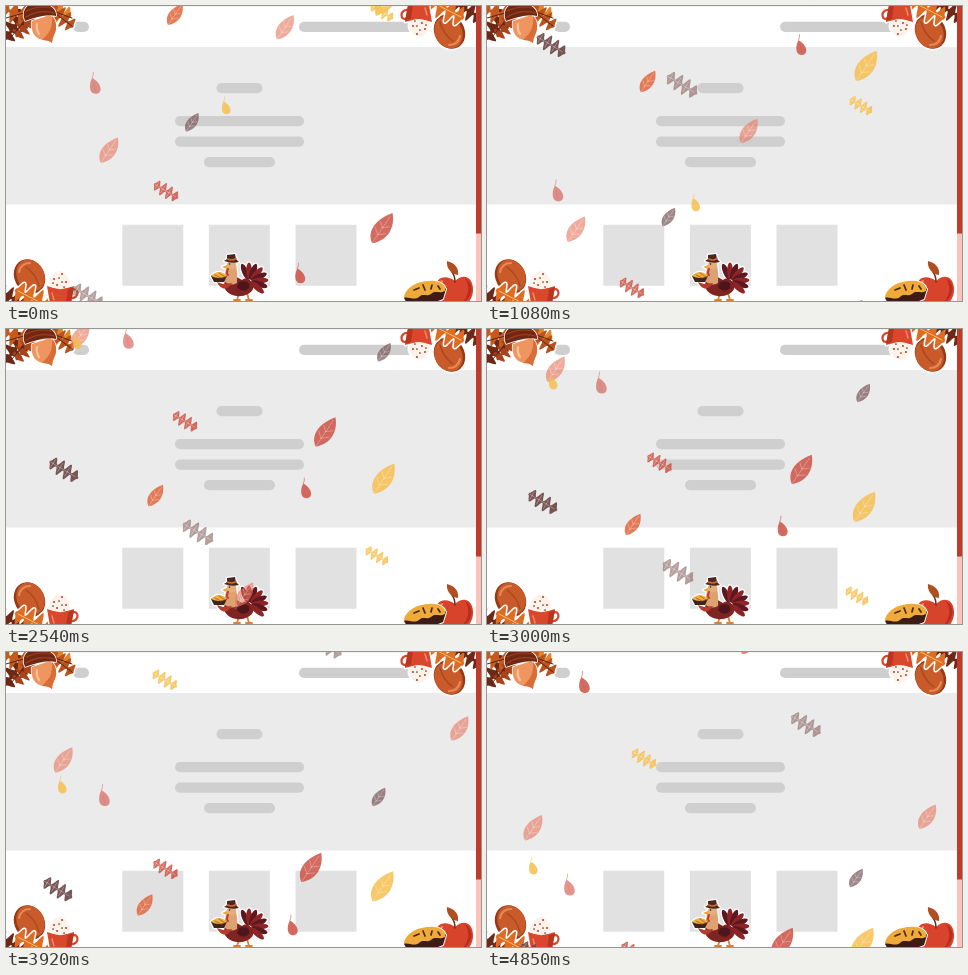
Recreate the animation shown at these times as an HTML page with a canvas. Size 475 px wide and 295 px high, loop 4920 ms.

```html
<!DOCTYPE html>
<html lang="en">
<head>
<meta charset="utf-8">
<title>Falling autumn leaves</title>
<style>
html, body { margin: 0; width: 100%; height: 100%; overflow: hidden; background: #fff; }
canvas { display: block; width: 475px; height: 295px; }
</style>
</head>
<body>
<canvas id="stage" width="475" height="295"></canvas>
<script>
const ctx = document.getElementById('stage').getContext('2d');
const LOOP = 4920, STEPS = 64, STEP = LOOP / STEPS;

// Tints with their opacity
const RED = '#cc5448dd', PINK = '#e4755c99', ORANGE = '#e0673fdd', YELLOW = '#f5bd4ad0',
      PLUM = '#755156b3', DARK = '#67403fe0', MAUVE = '#845f5c99', ROSE = '#d0504699';

// shape, colour, size, x and y at the loop start, velocity in px/s
const FALLING = [
  ['leaf', ORANGE, 22, 169, 9, -7.7, 62.4],
  ['leaf', PINK, 25, 279, 22, -16, 96.4],
  ['oak', YELLOW, 26, 376, 6, -2, 87],
  ['drop', ROSE, 16, 89, 80, -17, 100],
  ['drop', YELLOW, 13, 220, 102, -10.7, 90],
  ['leaf', PLUM, 19, 186, 117, -4.1, 88],
  ['leaf', PINK, 26, 103, 145, -13, 73.4],
  ['oak', RED, 28, 160, 185, -14, 90],
  ['leaf', RED, 31, 376, 223, -10.6, 81],
  ['drop', RED, 15, 294, 270, -10, 83],
  ['oak', MAUVE, 34, 82, 290, -2, 85],
  ['oak', DARK, 33, 68.7, -36, -4.3, 69.7],
  ['oak', MAUVE, 35, 197.3, -13, -2.1, 85.3],
  ['drop', RED, 15, 324.5, -47, -9.7, 82.4],
  ['leaf', YELLOW, 31, 380, -5, -0.9, 61.3],
  ['oak', RED, 28, 214.8, -136, -14.1, 90],
  ['leaf', RED, 30, 345.4, -102.4, -10.3, 81.3],
  ['leaf', PINK, 26, 105.2, -179, -12.2, 73.4],
  ['drop', ROSE, 16, 166, -234, -17.3, 97],
  ['leaf', PLUM, 19, 388, -199, -3.9, 87.9],
  ['drop', YELLOW, 13, 98.4, -209, -10.8, 87.8],
  ['leaf', PINK, 25, 510, -298, -14.4, 95.7],
  ['oak', MAUVE, 34, 328.6, -340, -2, 85.2],
  ['oak', YELLOW, 28, 166.6, -307.5, -2, 85.5],
  ['drop', RED, 16, 179.5, -436.5, -17, 97],
  ['leaf', ORANGE, 22, 299.5, -310, -7.7, 62.4]
];

function makeOak() {
  const p = new Path2D(), n = 64;
  const half = s => 0.03 + 0.23 * Math.sin(4 * Math.PI * s) ** 2 * Math.sin(Math.PI * s) ** 0.3;
  for (let i = 0; i <= n; i++) p.lineTo(i / n - 0.5, -half(i / n));
  for (let i = n; i >= 0; i--) p.lineTo(i / n - 0.5, half(i / n));
  p.closePath();
  return p;
}

const SHAPES = {
  leaf: {
    body: new Path2D('M-.32 .46C-.5 .06-.2-.32 .34-.52C.42-.08 .22 .36-.32 .46Z'),
    veins: new Path2D('M-.37 .53L.26-.4M-.14 .18L-.22-.06M-.14 .18L.12 .15M.01-.04L-.05-.25M.01-.04L.25-.07')
  },
  oak: {
    body: makeOak(),
    veins: new Path2D('M-.54 0H.4M-.38 0V-.13M-.38 0V.13M-.13 0V-.15M-.13 0V.15M.12 0V-.15M.12 0V.15')
  },
  drop: {
    body: new Path2D('M-.17-.5C.06-.38 .36-.1 .35 .2C.34 .58-.24 .58-.3 .2C-.34-.04-.3-.3-.17-.5Z'),
    veins: new Path2D('M.04 .3L-.08-.2')
  }
};

function drawFalling([kind, colour, size, x, y, vx, vy], sec) {
  const cy = y + vy * sec;
  if (cy < -30 || cy > 325) return;
  const shape = SHAPES[kind];
  ctx.save();
  ctx.translate(x + vx * sec, cy);
  if (kind === 'oak') ctx.rotate(0.54);
  ctx.scale(size, size);
  ctx.fillStyle = ctx.strokeStyle = colour;
  ctx.fill(shape.body);
  ctx.lineWidth = 0.045;
  if (kind === 'drop') ctx.stroke(new Path2D('M-.17-.5Q-.08-.7-.1-.86'));
  ctx.globalAlpha = 0.4;
  ctx.strokeStyle = kind === 'drop' ? colour : '#fff';
  ctx.lineWidth = 0.7 / size;
  ctx.stroke(shape.veins);
  ctx.restore();
}

const oval = (x, y, rx, ry, turn = 0) => {
  const p = new Path2D();
  p.ellipse(x, y, rx, ry, turn, 0, 7);
  return p;
};
const oakAt = (x, y, size, turn) => {
  const p = new Path2D();
  p.addPath(SHAPES.oak.body, new DOMMatrix().translate(x, y).rotate(turn).scale(size, size * 1.25));
  return p;
};
const toPath = d => typeof d === 'string' ? new Path2D(d) : d;

// Each part is [path, colour, line width]; without a width it is filled.
function sticker(parts, rim = 3) {
  const list = parts.map(([d, ...style]) => [toPath(d), ...style]);
  ctx.lineJoin = ctx.lineCap = 'round';
  ctx.strokeStyle = '#fff';
  for (const [p, , w = 0] of list) { ctx.lineWidth = w + rim; ctx.stroke(p); }
  for (const [p, colour, w] of list) {
    ctx.fillStyle = ctx.strokeStyle = colour;
    ctx.lineWidth = w || 1;
    w ? ctx.stroke(p) : ctx.fill(p);
  }
}

const ACORN_LEAVES = [
  [oakAt(10, 19, 36, 128), '#6e2916'],
  [oakAt(12, 8, 36, 20), '#c65a1d'],
  [oakAt(19, 20, 28, 130), '#a8441b'],
  [oakAt(49, 5, 34, 18), '#e08428'],
  [oakAt(56, 11, 30, 42), '#b9521d'],
  ['M0 12L18 7M24 9L5 31M38 2L66 12M46 5L66 20', '#5c2113', 1]
];

const ACORN = [
  ['M26 15C24 25 29 33 37 34Q43 34 46 37Q46 33 48 29C52 22 50 13 44 9Z', '#ef9560'],
  ['M46 10C47 20 44 27 36 34Q43 34 46 37Q46 33 48 29C52 22 50 13 46 10Z', '#d96d38'],
  ['M31 18Q30 24 33 28', '#f9c397', 2.2],
  ['M19 15C15 5 20-3 32-3C43-3 51 3 50 10C41 8 30 11 19 15Z', '#702814'],
  ['M20 11Q34 3 48 7M20 5Q33-1 45 2', '#99411f', 1.2]
];

const NUT = [
  [oval(23.5, 270.5, 15, 18, -0.5), '#963916'],
  [oval(24.5, 269.5, 13.5, 16.5, -0.5), '#c95a2a'],
  ['M13 266Q15 257 24 257', '#e38a55', 2.2],
  ['M20 261Q30 268 33 280', '#a84720', 1.3]
];

const NUT_LEAVES = [
  [oakAt(6, 292, 32, 30), '#6e2916'],
  [oakAt(27, 293, 40, 28), '#dd6c24'],
  ['M12 285L43 301', '#f7c16b', 1]
];

const CUP = [
  ['M66 284C73 280 74 293 65 292', '#d5462b', 2.2],
  ['M41 280Q54 285 68 280L65 297H44Z', '#d9482c'],
  ['M62 283L68 281L65 297H60Z', '#b9351f'],
  ['M46 287L48 294', '#f08a6c', 1.5],
  ['M44 280C41 275 46 271 47 269C50 264 59 264 61 270C66 274 64 281 60 282Q52 285 44 280Z', '#fbf3ea'],
  ['M48 273h.1M56 268h.1M60 276h.1M51 279h.1', '#bd3a29', 1.9],
  ['M53 272h.1M47 277h.1M56 276h.1M58 281h.1', '#75402e', 1.7]
];

const APPLE = [
  ['M449 275C438 267 428 273 429 285C430 297 441 304 449 300C459 304 468 293 467 282C466 269 456 268 449 275Z', '#d8432b'],
  ['M459 272C468 277 469 291 454 299C464 290 464 280 459 272Z', '#b62e1f'],
  ['M436 275Q431 280 434 287', '#f38e6a', 2],
  ['M449 276Q449 270 446 266', '#6d2e19', 1.5],
  ['M452 269C445 268 440 262 441 255C449 257 453 262 452 269Z', '#b04f20']
];

const PIE = [
  ['M398 292Q404 278 420 276Q435 275 440 283L437 293Q424 299 402 299Z', '#3d1c18'],
  ['M398 292C398 284 409 275 423 275C433 274 441 279 439 285C434 288 429 284 425 288C421 291 417 287 413 291C408 295 402 290 398 292Z', '#efab3a'],
  ['M408 284L413 282M417 279L419 284M426 279L425 283M432 280L434 283', '#4d271c', 1.7]
];

const tailFeather = i => {
  const a = -1.95 + i * 0.38;
  return [oval(243 + 11 * Math.cos(a), 275 + 10 * Math.sin(a), 8.5, 2.9, a), i % 2 ? '#8f2426' : '#5b1820'];
};
const TURKEY = [
  ...Array.from({ length: 8 }, (_, i) => tailFeather(i)),
  ['M233 287L231 294M241 287L243 294M228 294H234M240 294H246', '#dd8030', 1.8],
  ['M222 266C220 272 217 276 219 283C225 293 243 292 247 283C248 275 241 270 236 274Z', '#7e2422'],
  ['M221 258C220 264 218 269 218 275Q224 281 231 277Q232 268 230 258Z', '#dca271'],
  [oval(225.5, 259, 4.7, 4.5), '#e3ae7b'],
  ['M221 259L216 261L221 263Z', '#efa52f'],
  ['M222 263Q220 267 222 269', '#c9382b', 2],
  ['M223.5 258h.1', '#2a1715', 1.4],
  ['M233 276Q245 273 243 282Q237 288 231 281Z', '#4e151c'],
  ['M226 277C221 286 214 283 211 276L217 278Z', '#b73b2d'],
  ['M205 270Q213 264 221 270L218 276H208Z', '#40241c'],
  ['M205 270Q213 262 221 270Q213 274 205 270Z', '#eeb141'],
  ['M209 269L215 272M213 267L219 271', '#b76a27', 1],
  ['M218 255Q226 258 233 256L230 253L229 248L221 249L221 253Z', '#4c2721'],
  ['M221.5 253Q226 255 230 252.5', '#d06b2b', 1.5]
];

function fill(colour, x, y, w, h, r = 0) {
  ctx.fillStyle = colour;
  ctx.beginPath();
  ctx.roundRect(x, y, w, h, r);
  ctx.fill();
}

function drawPage() {
  fill('#fff', 0, 0, 475, 295);
  fill('#eee', 0, 0, 470, 0.8);
  fill('#ebebeb', 0, 41, 470, 157.5);
  const bar = (x, y, w) => fill('#cfcfcf', x, y, w, 10.3, 5.1);
  bar(67, 15.7, 16);
  bar(293, 15.7, 120);
  bar(210.5, 77, 46);
  bar(169, 110, 129);
  bar(169, 130.5, 129);
  bar(198, 151, 71);
  for (let i = 0; i < 3; i++) fill('#e1e1e1', 116.3 + 86.6 * i, 218.7, 61, 61);
}

function drawHarvest() {
  for (const parts of [NUT, NUT_LEAVES, CUP]) sticker(parts);
}

function drawStickers() {
  sticker(ACORN_LEAVES);
  sticker(ACORN, 1.5);
  drawHarvest();
  ctx.save();
  ctx.translate(467, 296);
  ctx.rotate(Math.PI);
  drawHarvest();
  ctx.restore();
  sticker(APPLE);
  sticker(PIE, 2);
  sticker(TURKEY, 2.5);
}

function drawScrollbar() {
  fill('#fbc3ba', 470, 0, 5, 295);
  fill('#c23b2a', 470, 0, 5, 227.5);
}

const start = performance.now();
function render(now) {
  const t = Math.max(0, now - start) % LOOP;
  const step = Math.min(STEPS - 1, Math.floor((t + 4) / STEP));
  drawPage();
  drawStickers();
  for (const item of FALLING) drawFalling(item, step * STEP / 1000);
  drawScrollbar();
  requestAnimationFrame(render);
}
render(start);
</script>
</body>
</html>
```
